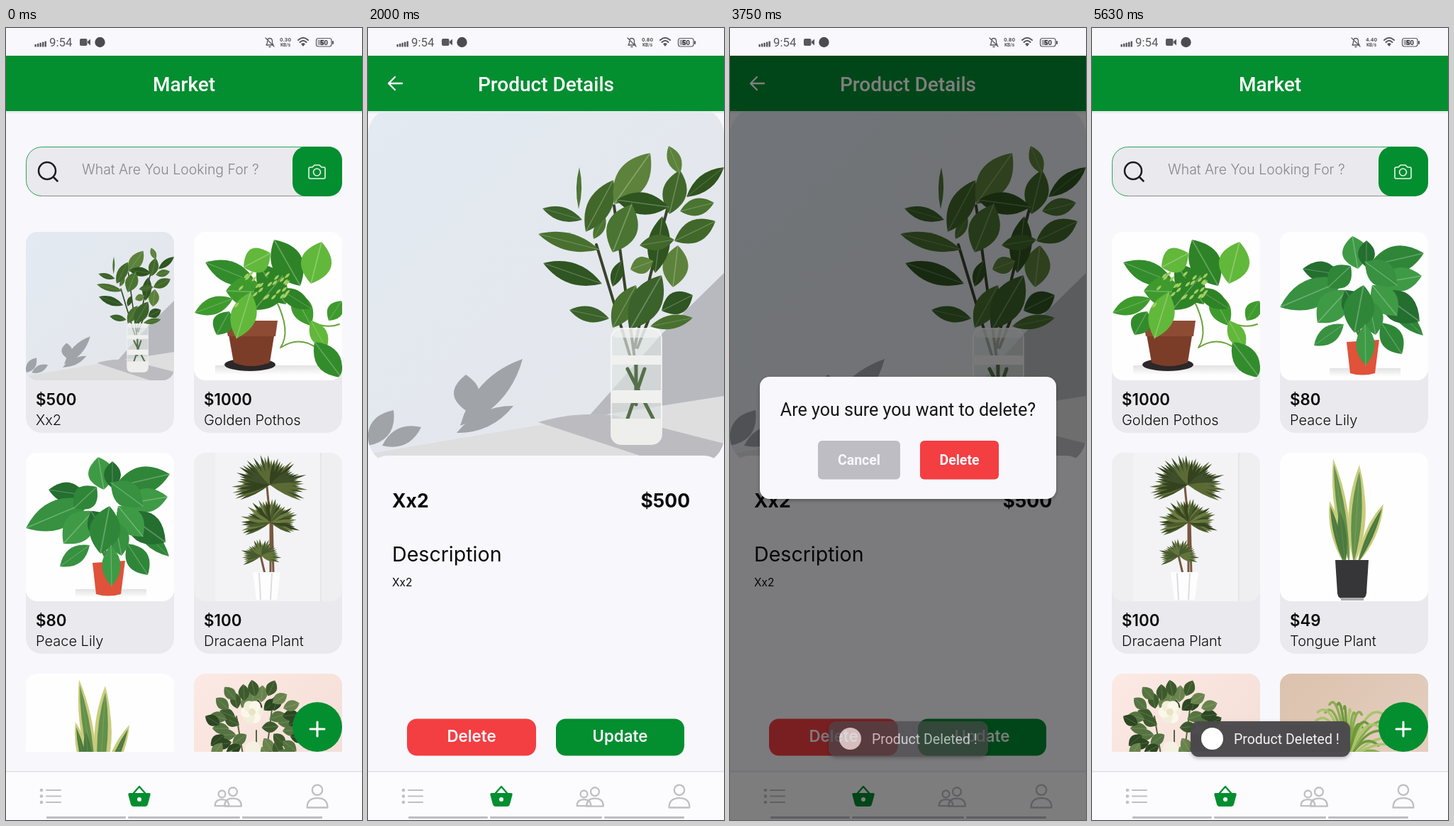
Animation, 502 px wide and 1115 px high, one loop 6.01 s. Source, as an HTML page:

```html
<!DOCTYPE html>
<html lang="en">
<head>
<meta charset="utf-8">
<style>
html, body { margin: 0; width: 100%; height: 100%; overflow: hidden; background: #f8f7fc; }
svg { display: block; width: 100%; height: 100%; }
text { font-family: Inter, sans-serif; }
.roboto { font-family: Roboto, sans-serif; }
.mid { text-anchor: middle; }
.title { font: 500 28px Roboto, sans-serif; fill: #fff; text-anchor: middle; }
.line { fill: none; stroke-linecap: round; stroke-linejoin: round; }
</style>
</head>
<body>
<svg id="stage" viewBox="0 0 502 1115"></svg>
<script>
const LOOP = 6010, GREEN = '#038e30', RED = '#f33e42', PAPER = '#f8f7fc', CARD = '#eae9ed';
const rnd = i => { const v = Math.sin(i * 12.9898 + 4) * 43758.5453; return v - Math.floor(v); };
const range = n => [...Array(n).keys()];
const rect = (x, y, w, h, fill, r = 0, more = '') =>
  `<rect x="${x}" y="${y}" width="${w}" height="${h}" rx="${r}" fill="${fill}" ${more}/>`;
const circle = (x, y, r, fill, more = '') => `<circle cx="${x}" cy="${y}" r="${r}" fill="${fill}" ${more}/>`;
const shape = (d, fill, more = '') => `<path d="${d}" fill="${fill}" ${more}/>`;
const line = (d, color, w = 2) => `<path class="line" d="${d}" stroke="${color}" stroke-width="${w}"/>`;
const text = (x, y, s, size, weight = 400, fill = '#0b0b0c', more = '') =>
  `<text x="${x}" y="${y}" font-size="${size}" font-weight="${weight}" fill="${fill}" ${more}>${s}</text>`;

// ---- plants, each drawn in a 209 x 209 photo ----
function leaf(x1, y1, x2, y2, w, fill, rib = true) {
  const mx = (x1 + x2) / 2, my = (y1 + y2) / 2, d = Math.hypot(x2 - x1, y2 - y1);
  const nx = (y1 - y2) / d * w * 1.2, ny = (x2 - x1) / d * w * 1.2;
  return shape(`M${x1} ${y1}Q${mx + nx} ${my + ny} ${x2} ${y2}Q${mx - nx} ${my - ny} ${x1} ${y1}`, fill) +
    (rib ? line(`M${x1} ${y1}L${x2} ${y2}`, '#ffffff40', w / 20) : '');
}
const leaves = (n, colors, rib) => range(n.length / 5)
  .map(i => leaf(...n.slice(i * 5, i * 5 + 5), colors[i % colors.length], rib)).join('');
const tuft = (x, y, r, n, w, colors, seed, squash = .8) => range(n).map(i => {
  const a = Math.PI * (.82 + 1.36 * (i * 7 % n) / (n - 1)), l = r * (.72 + .3 * rnd(i + seed));
  return leaf(x, y, x + l * Math.cos(a), y + l * squash * Math.sin(a), w, colors[i % colors.length], false);
}).join('');
const white = rect(0, 0, 209, 209, '#fefefe');

const vase = () => `<g transform="scale(.4163) translate(0 -112)">` +
  rect(0, 112, 502, 502, 'url(#wall)') +
  shape('M502 345L415 430L310 548L502 520Z', '#b7b9be') +
  shape('M0 600Q140 575 330 545L502 518V614H0Z', '#dededf') +
  shape('M240 555Q290 540 345 545L502 585V614H420Z', '#bcbcc0') +
  leaves([130, 560, 218, 466, 28, 140, 540, 138, 488, 30, 125, 570, 205, 532, 18,
    0, 588, 36, 538, 24, 20, 588, 75, 562, 20], ['#a0a4a9'], false) +
  line('M372 470L322 305M378 480L347 250M376 450Q400 330 432 220M380 450L400 400', '#39432b', 4) +
  leaves([425, 262, 440, 200, 28, 440, 205, 424, 166, 16, 449, 238, 502, 196, 18, 440, 258, 488, 246, 20,
    432, 300, 490, 272, 26, 430, 365, 437, 306, 30, 405, 345, 415, 265, 26, 297, 255, 298, 196, 6,
    383, 306, 432, 298, 18, 370, 340, 402, 328, 20, 345, 364, 357, 328, 14, 318, 297, 335, 266, 12,
    307, 287, 346, 214, 28, 347, 248, 398, 176, 36, 350, 242, 424, 252, 26, 345, 316, 372, 248, 36],
    ['#41682a', '#5d823b', '#2f541f', '#4a7431']) +
  leaves([302, 270, 246, 254, 16, 326, 312, 240, 290, 20, 330, 360, 247, 331, 24, 340, 409, 284, 397, 18,
    345, 422, 378, 362, 26, 414, 398, 458, 376, 26, 370, 424, 414, 348, 36, 398, 420, 458, 408, 16],
    ['#3a622a', '#48702f', '#2f5523']) +
  rect(343, 423, 71, 163, '#dfe4e3a8', 14, 'stroke="#ffffffb0" stroke-width="2"') +
  line('M366 550L390 480M402 550L366 480M378 530V470', '#55704a', 5) +
  rect(345, 423, 67, 13, '#f4f5f4a0', 5) + rect(343, 461, 71, 13, '#f0f1ef') +
  rect(343, 510, 71, 18, '#f0f1ef') + shape('M343 550H414V570Q414 586 398 586H359Q343 586 343 570Z', '#eeeeec') + '</g>';

const pothos = () => white + rect(30, 188, 150, 14, 'url(#floor)') +
  line('M115 95Q138 140 122 163Q150 145 175 165M110 90Q150 85 150 115Q180 140 205 130', '#69a43b', 2) +
  `<ellipse cx="79" cy="187" rx="36" ry="9" fill="#2c2728"/>` +
  shape('M46 128H116L107 184Q80 194 56 184Z', '#7c3d28') + shape('M44 125H118L115 147H48Z', '#8d4b34') +
  leaves([140, 85, 165, 132, 24, 120, 80, 165, 108, 20, 165, 125, 187, 165, 20, 170, 155, 208, 205, 28,
    190, 125, 208, 97, 18, 150, 76, 113, 11, 36, 165, 73, 180, 14, 36, 88, 72, 16, 43, 26, 55, 94, 1, 114, 20,
    130, 102, 90, 45, 32, 70, 50, 108, 30, 30, 50, 112, 32, 145, 24, 100, 85, 45, 83, 34,
    85, 110, 125, 62, 32, 80, 85, 60, 150, 30], ['#3f9a2e', '#2e8326', '#62b83a', '#338c2c']) +
  range(26).map(i => leaf(55 + rnd(i) * 75, 62 + rnd(i + 40) * 45, 62 + rnd(i) * 75, 55 + rnd(i + 40) * 45, 3, '#a4cf62', false)).join('');

const lily = () => white + rect(70, 192, 100, 12, 'url(#floor)') +
  line('M116 165L105 90M120 165L130 85M118 160L90 100', '#3f7d3a', 3) +
  shape('M94 155L140 152L134 199Q116 204 99 199Z', '#e0523a') +
  leaves([125, 48, 203, 30, 32, 140, 72, 200, 62, 28, 85, 60, 32, 52, 24, 90, 68, 0, 106, 34, 150, 95, 202, 146, 18,
    110, 52, 102, 6, 30, 122, 50, 122, 12, 20, 120, 42, 165, 75, 30, 100, 48, 68, 78, 28, 95, 82, 53, 128, 34,
    140, 85, 197, 126, 36, 90, 130, 48, 160, 20, 143, 128, 172, 172, 26, 130, 75, 165, 118, 30,
    115, 120, 92, 82, 28, 135, 145, 125, 95, 26, 118, 75, 105, 142, 36, 120, 130, 121, 188, 22],
    ['#2f8638', '#3f9a45', '#246e30', '#379140']);

const dracaena = () => rect(0, 0, 209, 209, '#efeff1') + rect(30, 0, 150, 209, '#f3f3f5') + rect(178, 0, 2, 209, '#e6e6e9') +
  line('M108 170V100L103 48M112 170L110 92M100 170L94 145', '#79573f', 3) +
  tuft(107, 45, 54, 44, 4, ['#3f4f2a', '#5c6b35', '#34421f'], 1) +
  tuft(108, 98, 43, 38, 4, ['#4a5b2d', '#6b7a40', '#37451f'], 9) +
  tuft(95, 145, 30, 30, 3, ['#47592f', '#63743b'], 20) +
  shape('M83 168H122L117 207H88Z', '#fdfdfd') + line('M92 170L94 206M110 170L108 206', '#dcdce0', 2);

const snake = () => white +
  leaves([90, 155, 70, 68, 13, 98, 155, 75, 8, 15, 92, 155, 84, 72, 16, 104, 155, 112, 17, 19,
    110, 155, 146, 72, 13, 106, 155, 118, 50, 13].map(v => v), ['#c8cc7c']) +
  leaves([90, 155, 71, 75, 7, 98, 155, 76, 16, 9, 92, 155, 84, 80, 10, 104, 155, 112, 26, 12, 110, 155, 144, 78, 7],
    ['#4c7a3d', '#63904a']) +
  shape('M78 151H125L122 198Q121 206 112 206H91Q82 206 81 198Z', '#363638') + rect(86, 204, 32, 4, '#a8a8a8');

const gardenia = () => rect(0, 0, 209, 209, 'url(#blush)') +
  line('M85 209L60 60M90 209L110 50M88 209V80', '#59633e', 2) +
  range(46).map(i => {
    const a = i * 2.4, r = 9 + 42 * Math.sqrt(i / 46), x = 86 + r * 1.05 * Math.cos(a), y = 76 + r * .95 * Math.sin(a);
    return leaf(x, y, x + 24 * Math.cos(a + rnd(i) - .5), y + 24 * Math.sin(a + rnd(i) - .5), 13,
      ['#3d5a2c', '#557440', '#2c4721', '#69834d'][i % 4]);
  }).join('') +
  range(6).map(i => circle(82 + 8 * Math.cos(i * 1.05), 54 + 9 * Math.sin(i * 1.05), 8, i % 2 ? '#fbf8ea' : '#f1eedb')).join('') +
  circle(82, 54, 5, '#e9e3c4') + circle(83, 106, 11, '#f4f1e2');

const spider = () => rect(0, 0, 209, 209, 'url(#tan)') +
  range(26).map(i => {
    const a = Math.PI * (1.02 + .96 * (i * 7 % 26) / 25), r = 45 + 36 * rnd(i), x = 95 + r * 1.05 * Math.cos(a), y = 112 + r * Math.sin(a);
    return line(`M95 125Q${95 + (x - 95) * .5} ${y - 12} ${x} ${y + 8}`, ['#6f9a3c', '#a9c46b', '#89ad50'][i % 3], 3.5);
  }).join('');

const photos = { vase, pothos, lily, dracaena, snake, gardenia, spider };
const goods = [['vase', '$500', 'Xx2'], ['pothos', '$1000', 'Golden Pothos'], ['lily', '$80', 'Peace Lily'],
  ['dracaena', '$100', 'Dracaena Plant'], ['snake', '$49', 'Tongue Plant'], ['gardenia', '$65', 'Gardenia'], ['spider', '$30', 'Spider Plant']];

// ---- screens ----
const gradient = (id, a, b, dir = 'x2="1" y2="1"') =>
  `<linearGradient id="${id}" x1="0" y1="0" ${dir}><stop stop-color="${a}"/><stop offset="1" stop-color="${b}"/></linearGradient>`;
const clip = (id, r) => `<clipPath id="${id}">${r}</clipPath>`;
const defs = () => '<defs>' + gradient('wall', '#e3eaf2', '#e4e6ea') + gradient('floor', '#e2e2e4', '#ffffff', 'x2="0" y2="1"') +
  gradient('blush', '#fde9e3', '#f0dcd4') + gradient('tan', '#dcc2ae', '#e6d2c4') +
  clip('photo', rect(0, 0, 209, 209, '#000', 16)) + clip('body', rect(0, 39, 502, 1008, '#000')) +
  clip('below', rect(0, 39, 502, 1076, '#000')) + clip('list', rect(0, 240, 502, 779, '#000')) + clip('hero', rect(0, 117, 502, 520, '#000')) +
  '<filter id="shadow" x="-30%" y="-30%" width="160%" height="170%"><feDropShadow dx="0" dy="2" stdDeviation="2.5" flood-opacity=".3"/></filter>' +
  Object.entries(photos).map(([id, draw]) => `<g id="${id}" clip-path="url(#photo)">${draw()}</g>`).join('') + '</defs>';

const card = ([id, price, name], i) =>
  `<g class="card" transform="translate(${28 + i % 2 * 237} ${287 + 311 * (i >> 1)})">${rect(0, 0, 209, 283, CARD, 22)}` +
  `<use href="#${id}"/>${text(14, 244, price, 22.3, 600)}${text(14, 272, name, 20, 300)}</g>`;
const list = (id, items) => `<g id="${id}">${items.map(card).join('')}</g>`;
const header = title => rect(0, 39, 502, 1008, PAPER) + rect(0, 117, 502, 3, '#0000000c') +
  rect(0, 0, 502, 117, GREEN) + `<text class="title" x="251" y="89">${title}</text>`;

const market = () => `<g id="market">` + header('Market') +
  rect(28.5, 167.5, 445, 69, CARD, 22, 'stroke="#2aa45a"') + line('M50 236.500H430', '#86918b', 1) +
  circle(58, 201, 12, 'none', 'stroke="#1c1c1e" stroke-width="2.500"') + line('M67 210L72.500 215.500', '#1c1c1e', 2.5) +
  text(107, 206, 'What Are You Looking For ?', 19.4, 300, '#85858a') +
  rect(404, 167, 70, 70, GREEN, 19) +
  line('M429 196H432L435 193H442L445 196H448Q450 196 450 198V210Q450 212 448 212H429Q427 212 427 210V198Q427 196 429 196Z', '#e8f6ec', 1.6) +
  circle(438.5, 203, 5, 'none', 'stroke="#e8f6ec" stroke-width="1.600"') +
  `<g clip-path="url(#list)">${list('before', goods.slice(0, 6))}${list('after', goods.slice(1))}</g>` +
  circle(439, 984, 35, GREEN) + line('M439 977V997M429 987H449', '#fff', 3) +
  `<g id="spinner">${circle(0, 0, 20.5, '#fafafa', 'filter="url(#shadow)"')}</g></g>`;

const button = (id, x, y, w, h, r, fill, label, size, font) => `<g id="${id}">${rect(x, y, w, h, fill, r)}` +
  text(x + w / 2, y + h / 2 + size * .36 - (font ? 0 : 2), label, size, font ? 700 : 600, PAPER, `class="mid ${font}"`) + '</g>';

const details = () => `<g id="details">` + header('Product Details') + line('M48 78H30M38 69L29 78L38 87', '#fff', 2.3) +
  `<g clip-path="url(#hero)"><use href="#vase" transform="translate(0 112) scale(2.402)"/></g>` +
  rect(0, 602, 502, 445, PAPER, 28) + rect(0, 650, 502, 397, PAPER) +
  text(34, 675, 'Xx2', 26.5, 700) + text(454, 675, '$500', 26.5, 700, '#0b0b0c', 'text-anchor="end"') +
  text(34, 751, 'Description', 28.6, 400) + text(34, 786, 'Xx2', 15.5, 400) +
  button('remove', 55, 972.5, 182, 52, 14, RED, 'Delete', 22.3, '') + button('update', 265, 972.5, 181, 52, 14, GREEN, 'Update', 22.3, '') + '</g>';

const modal = () => `<g clip-path="url(#below)"><g id="modal">` + rect(0, 39, 502, 1076, '#00000080') +
  rect(42, 491, 418, 172, PAPER, 14, 'filter="url(#shadow)"') +
  text(251, 546, 'Are you sure you want to delete?', 25.1, 400, '#151516', 'class="mid roboto"') +
  button('cancel', 124, 581, 116, 54.5, 6, '#bebdc4', 'Cancel', 19.5, 'roboto') +
  button('confirm', 268, 581, 111, 54.5, 6, RED, 'Delete', 19.5, 'roboto') + '</g></g>';

const toast = () => `<g id="toast">` + rect(139, 976, 225, 50, '#4a484cf5', 11, 'filter="url(#shadow)"') +
  circle(169.5, 1000.5, 15.5, '#fff') + text(200, 1008, 'Product Deleted !', 19.5, 400, '#f2f2f3', 'class="roboto"') + '</g>';

const person = (x, y, k) => circle(x, y - 8 * k, 7 * k, 'none', 'stroke="#c0bfc4" stroke-width="2.300"') +
  line(`M${x - 14 * k} ${y + 16 * k}Q${x - 14 * k} ${y + 3 * k} ${x} ${y + 3 * k}T${x + 14 * k} ${y + 16 * k}Z`, '#c0bfc4', 2.3);
const tabs = () => rect(0, 1047, 502, 68, '#fcfbfe') + rect(0, 1046, 502, 1.5, '#e2e1e6') +
  [1073, 1081.5, 1090].map(y => circle(50, y, 2.3, '#c0bfc4') + line(`M57 ${y}H77`, '#c0bfc4', 2.2)).join('') +
  shape('M174 1077H202Q204 1077 203.500 1080L200 1093Q199 1096 196 1096H180Q177 1096 176 1093L172.500 1080Q172 1077 174 1077Z', GREEN) +
  line('M180 1077L188 1068L196 1077', GREEN, 2.4) + circle(188, 1086, 3, '#fff') +
  person(304.5, 1084, .7) + person(320, 1082, .85) + person(439, 1081, 1.03) +
  [[57, 169], [172, 330], [333, 446]].map(([a, b]) => rect(a, 1110, b - a, 3, '#bdbcc1', 1)).join('');

const status = () => rect(0, 0, 502, 39, '#f9f8fd') +
  range(5).map(i => rect(40.5 + i * 3.5, 23 - i * 1.1, 2.4, 3.5 + i * 1.1, '#58575b')).join('') +
  text(61, 26, '9:54', 16.8, 400, '#58575b', 'class="roboto"') +
  rect(104, 15, 10.5, 10, '#58575b', 2) + shape('M115 19L119 15.500V24.500L115 21Z', '#58575b') + circle(132.5, 20, 7.2, '#4c4b4f') +
  line('M367 24H377L375.500 21V18Q375 14.500 372 14.500Q369 14.500 368.500 18V21ZM371 26.500H373M366 14L378 26', '#58575b', 1.3) +
  text(394, 19, '', 8, 600, '#58575b', 'id="rate" class="mid roboto"') + text(394, 26, 'KB/s', 6.5, 600, '#58575b', 'class="mid roboto"') +
  line('M412 17Q419 10.500 426 17M414.500 20Q419 15.500 423.500 20', '#58575b', 2) + shape('M416 22.500Q419 19.500 422 22.500L419 26Z', '#58575b') +
  rect(437.5, 14.5, 21.5, 11.5, 'none', 3, 'stroke="#58575b" stroke-width="1.200"') + rect(439.5, 16.5, 9, 7.5, '#a9a8ad', 1) +
  rect(460, 18, 2, 5, '#58575b', 1) + text(448.5, 23.8, '50', 9.5, 700, '#2f2e31', 'class="mid roboto"');

const stage = document.getElementById('stage');
stage.innerHTML = defs() + `<g clip-path="url(#body)">${market()}${details()}</g>` + tabs() + modal() + toast() + status();

// ---- motion ----
const el = id => document.getElementById(id);
const ramp = (t, a, b) => Math.min(1, Math.max(0, (t - a) / (b - a)));
const easeOut = (u, n) => 1 - (1 - u) ** n;
const fade = (node, v) => { node.setAttribute('opacity', v); node.style.display = v > 0 ? '' : 'none'; };
const zoom = (node, s) => node.setAttribute('transform', `translate(251 520) scale(${s}) translate(-251 -520)`);
const dip = (t, a, b, c, d, low) => 1 - (1 - low) * (ramp(t, a, b) - ramp(t, c, d));
const firstCard = el('before').firstChild;

function draw(t) {
  el('rate').textContent = t < 2000 ? '0.30' : t < 5000 ? '0.80' : '4.40';

  // pushing and popping the product screen
  const p = easeOut(ramp(t, 1234, 1634), 4) - easeOut(ramp(t, 3760, 3995), 4);
  zoom(el('market'), 1 + .075 * p);
  fade(el('market'), p < 1 ? 1 : 0);
  zoom(el('details'), .925 + .075 * p);
  fade(el('details'), ramp(p, .75, .875));

  fade(firstCard, dip(t, 1090, 1240, 1260, 1420, .24));
  fade(el('remove'), dip(t, 2260, 2400, 2540, 2740, .35));
  fade(el('confirm'), dip(t, 3130, 3250, 3380, 3600, .3));

  const up = easeOut(ramp(t, 2440, 2750), 2.03) - ramp(t, 3760, 3985);
  el('modal').setAttribute('transform', `translate(0 ${1076 * (1 - up)})`);
  fade(el('modal'), up > 0 ? 1 : 0);
  fade(el('toast'), ramp(t, 3560, 3830));

  const refreshed = t >= 4380;
  fade(el('before'), refreshed ? 0 : 1);
  fade(el('after'), refreshed ? 1 : 0);
  const spin = ramp(t, 3880, 3995) - ramp(t, 4380, 4500);
  el('spinner').setAttribute('transform', `translate(251 206) scale(${spin})`);
  fade(el('spinner'), spin > 0 ? 1 : 0);
}
function tick() {
  draw(performance.now() % LOOP);
  requestAnimationFrame(tick);
}
tick();
</script>
</body>
</html>
```
